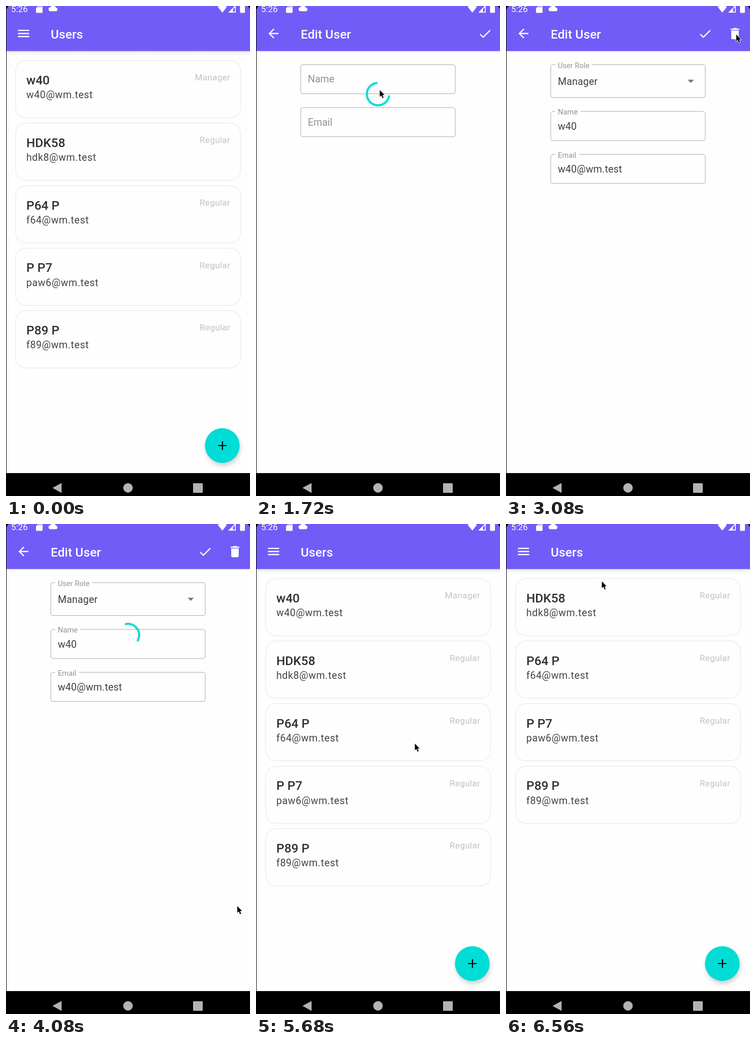
An HTML page for the animation above (6.6 s loop, 480 px wide and 962 px high).

```html
<!DOCTYPE html>
<html lang="en">
<head>
<meta charset="utf-8">
<title>Users</title>
<style>
html, body { margin: 0; width: 100%; height: 100%; overflow: hidden; background: #000; }
svg { display: block; width: 480px; height: 962px; font-family: Roboto, "Noto Sans", sans-serif; }
.title { font-size: 24.44px; font-weight: 500; fill: #fff; letter-spacing: .1px; }
.name { font-size: 24.44px; font-weight: 500; fill: #303030; }
.mail { font-size: 19.55px; fill: #444; letter-spacing: .61px; }
.role { font-size: 17.1px; fill: #c3c3c3; letter-spacing: .3px; text-anchor: end; }
.value { font-size: 19.55px; fill: #404040; letter-spacing: .18px; }
.label { font-size: 19.55px; fill: #929292; }
.small { font-size: 14.67px; fill: #989898; }
.box { fill: none; stroke: #b8b8b8; stroke-width: 1.25; }
.face { fill: #fefefe; filter: drop-shadow(0 .8px .9px rgba(0,0,0,.2)); }
.arc { fill: none; stroke: #00dcd2; stroke-width: 4.2; stroke-linecap: square; }

/* every clip shares one 6.6 s loop */
#edit, .loaded, .shift, .float, #check, #gone, #rest, #ripple, #cursor, .spin, .arc {
  animation: 6.6s linear infinite;
}
#edit { animation-name: page; }
@keyframes page {
  0%, 18.79% { opacity: 0; }
  20.3%, 77.27% { opacity: 1; }
  79.39%, 100% { opacity: 0; }
}
.loaded { animation-name: loaded; animation-timing-function: step-end; }
@keyframes loaded { 0% { visibility: hidden; } 29.09%, 100% { visibility: visible; } }
.shift { animation-name: shift; animation-timing-function: step-end; }
@keyframes shift { 0% { transform: none; } 29.09%, 100% { transform: translateY(91.8px); } }
#check { animation-name: check; animation-timing-function: step-end; }
@keyframes check { 0% { transform: none; } 29.09%, 100% { transform: translateX(-58.7px); } }
.float { animation-name: float; animation-timing-function: cubic-bezier(.4,0,.2,1); }
@keyframes float {
  0%, 29.09% { transform: translate(102px,35.2px); }
  31.52%, 100% { transform: translate(102px,6.6px) scale(.75); }
}
#gone { animation-name: gone; }
@keyframes gone { 0%, 90.3% { opacity: 1; } 92.12%, 100% { opacity: 0; } }
#rest { animation-name: rest; animation-timing-function: ease-in-out; }
@keyframes rest {
  0%, 92.12% { transform: none; }
  95.91%, 100% { transform: translateY(-122.8px); }
}
#ripple { animation-name: ripple; }
@keyframes ripple {
  0%, 14.54% { transform: scale(.26); opacity: 0; }
  15.45% { opacity: 1; }
  19.09%, 21.2% { transform: scale(1); opacity: 1; }
  21.21%, 100% { transform: scale(1); opacity: 0; }
}
#cursor { animation-name: cursor; animation-timing-function: ease-in-out; }
@keyframes cursor {
  0%, 4.85% { transform: translate(300px,975px); }
  11.52%, 26.36% { transform: translate(243.5px,165px); }
  30.91%, 35.15% { transform: translate(212px,483px); }
  44.85%, 48.48% { transform: translate(453px,56px); }
  55.15%, 78.5% { transform: translate(455px,750px); }
  86.06%, 87.27% { transform: translate(312.5px,431px); }
  98.18%, 100% { transform: translate(188.5px,112.5px); }
}

/* indeterminate rings: steady turn plus growing and shrinking arc */
#load { animation-name: turnA; }
#remove { animation-name: turnB; }
#load .arc { animation-name: arcA; }
#remove .arc { animation-name: arcB; }
.arc { animation-timing-function: cubic-bezier(.4,0,.2,1); stroke-dasharray: 0 1440; }
@keyframes turnA {
  0%, 19.31% { transform: rotate(0); visibility: hidden; }
  19.32% { transform: rotate(0); visibility: visible; }
  29.08% { transform: rotate(148deg); visibility: visible; }
  29.09%, 100% { transform: rotate(148deg); visibility: hidden; }
}
@keyframes arcA {
  0%, 19.32% { stroke-dasharray: 0 1440; }
  29.41%, 100% { stroke-dasharray: 270 1440; }
}
@keyframes turnB {
  0%, 48.1% { transform: rotate(0); visibility: hidden; }
  48.11% { transform: rotate(0); visibility: visible; }
  76.96% { transform: rotate(437.4deg); visibility: visible; }
  76.97%, 100% { transform: rotate(437.4deg); visibility: hidden; }
}
@keyframes arcB {
  0%, 48.11% { stroke-dasharray: 0 1440; stroke-dashoffset: 0; }
  58.2% { stroke-dasharray: 270 1440; stroke-dashoffset: 0; }
  68.29% { stroke-dasharray: 0 1440; stroke-dashoffset: -270; }
  78.38%, 100% { stroke-dasharray: 270 1440; stroke-dashoffset: -270; }
}
</style>
</head>
<body>
<svg viewBox="0 0 480 962">
  <defs>
    <clipPath id="screen"><rect x="1" y="-2.5" width="479" height="940" rx="12.5"/></clipPath>
    <clipPath id="cardClip"><rect x="19.5" y="107.5" width="441.5" height="111.5" rx="20"/></clipPath>
    <linearGradient id="fall" x2="0" y2="1">
      <stop stop-color="#000" stop-opacity=".12"/>
      <stop offset=".4" stop-color="#000" stop-opacity=".035"/>
      <stop offset="1" stop-color="#000" stop-opacity="0"/>
    </linearGradient>
    <filter id="soft" x="-50%" y="-50%" width="200%" height="200%"><feGaussianBlur stdDeviation="4"/></filter>
    <path id="ring" pathLength="720" d="M0-22a22 22 0 0 1 0 44a22 22 0 0 1 0-44a22 22 0 0 1 0 44a22 22 0 0 1 0-44"/>
  </defs>
  <rect width="480" height="962"/>

  <g clip-path="url(#screen)">
    <g id="users">
      <rect width="480" height="917" fill="#fefefe"/>
      <rect y="88" width="480" height="10" fill="url(#fall)"/>
      <rect width="480" height="88.5" fill="#715cf8"/>
      <path transform="translate(19.9 39.3) scale(1.222)" fill="#fff" d="M3 18h18v-2H3v2zm0-5h18v-2H3v2zm0-7v2h18V6H3z"/>
      <text class="title" x="88" y="64">Users</text>
      <g id="gone"></g>
      <g id="rest"></g>
      <circle cx="427" cy="869" r="34" fill="#000" opacity=".17" filter="url(#soft)"/>
      <circle cx="425.5" cy="863" r="34.2" fill="#00dcd6"/>
      <path d="M417.3 863h17M425.8 854.5v17" stroke="#000" stroke-width="2.2"/>
    </g>

    <g id="edit">
      <rect width="480" height="917" fill="#fefefe"/>
      <rect y="88" width="480" height="4" fill="url(#fall)" opacity=".6"/>
      <rect width="480" height="88.5" fill="#715cf8"/>
      <g fill="#fff">
        <path transform="translate(19.7 39.3) scale(1.222)" d="M20 11H7.83l5.59-5.59L12 4l-8 8 8 8 1.41-1.41L7.83 13H20v-2z"/>
        <g id="check"><path transform="translate(435.8 39.8) scale(1.222)" d="M9 16.17L4.83 12l-1.42 1.41L9 19 21 7l-1.41-1.41z"/></g>
        <g class="loaded"><path transform="translate(435.8 39.5) scale(1.222)" d="M6 19c0 1.1.9 2 2 2h8c1.1 0 2-.9 2-2V7H6v12zM19 4h-3.5l-1-1h-5l-1 1H5v2h14V4z"/></g>
      </g>
      <text class="title" x="88" y="64">Edit User</text>
      <g class="loaded">
        <rect class="box" x="88" y="115" width="304" height="64.6" rx="4.5"/>
        <rect x="97" y="112" width="72.5" height="6" fill="#fefefe"/>
        <text class="small" x="102" y="122">User Role</text>
        <text class="value" x="102" y="155.3">Manager</text>
        <path d="M357.4 144.8h12.2l-6.1 6.1z" fill="#777"/>
      </g>
      <g class="shift" id="fields"></g>
      <g transform="translate(240 173)"><g class="spin" id="load"><use class="arc" href="#ring"/></g></g>
      <g transform="translate(240 218)"><g class="spin" id="remove"><use class="arc" href="#ring"/></g></g>
    </g>

    <g id="status" fill="#fff">
      <text x="10" y="12.3" font-size="17">5:26</text>
      <path d="M63.5 0H72v12a1.4 1.4 0 0 1-1.4 1.4H60.4A1.4 1.4 0 0 1 59 12V4.5z"/>
      <path d="M64 0v3M67 0v3M70 0v3" stroke="#715cf8" stroke-width="1.2"/>
      <path d="M88 10.2a4 4 0 0 1-.6-8A5.8 5.8 0 0 1 98 3.1a3.6 3.6 0 0 1 .3 7.1z"/>
      <path d="M416.5 1.8Q418.5 0 420 0h11q1.700 0 3.500 1.800L425.600 13z"/>
      <path d="M437 13L452 -2V13zM446.500 6V11.400H450.300V2.200z" fill-rule="evenodd"/>
      <rect x="460.400" y="-2" width="9.600" height="15.400" rx="1.300"/>
    </g>
  </g>

  <rect y="917" width="480" height="45"/>
  <g fill="#b3b3b3">
    <path d="M91.500 946L109.300 936.500V956z"/>
    <circle cx="240" cy="946" r="9.300"/>
    <rect x="368" y="937" width="19" height="18.800" rx="1"/>
  </g>

  <g id="cursor">
    <path d="M0 0V13.200L3 10.500L5.300 15.900L7.500 15L5.300 9.700H9.300z" stroke="#fff" stroke-width="1.600" paint-order="stroke" stroke-linejoin="round"/>
  </g>
</svg>

<script>
const people = [
  ["w40", "w40", "Manager"],
  ["HDK58", "hdk8", "Regular"],
  ["P64 P", "f64", "Regular"],
  ["P P7", "paw6", "Regular"],
  ["P89 P", "f89", "Regular"]
];
const get = id => document.getElementById(id);
const mail = user => user + "@wm.test";

const ripple = `<g clip-path="url(#cardClip)"><g transform="translate(243.5 163)">
  <circle id="ripple" r="228" fill="#efefef"/></g></g>`;

function card([name, user, role], i) {
  return `<g transform="translate(0 ${i * 122.8})">
    <rect class="face" x="19.5" y="107.5" width="441.5" height="111.5" rx="20"/>
    <rect x="19.5" y="107.5" width="441.5" height="111.5" rx="20" fill="none" stroke="#f1f1f1"/>
    ${i ? "" : ripple}
    <text class="name" x="40" y="154">${name}</text>
    <text class="mail" x="40" y="181.3">${mail(user)}</text>
    <text class="role" x="441" y="146.3">${role}</text>
  </g>`;
}

function field(label, value, y, gap) {
  return `<g transform="translate(0 ${y})">
    <rect class="box" x="88" y="0" width="304" height="57.3" rx="4.5"/>
    <rect class="loaded" x="97" y="-3" width="${gap}" height="6" fill="#fefefe"/>
    <text class="label float">${label}</text>
    <text class="value loaded" x="102" y="36.3">${value}</text>
  </g>`;
}

const cards = people.map(card);
get("gone").innerHTML = cards[0];
get("rest").innerHTML = cards.slice(1).join("");
get("fields").innerHTML =
  field("Name", people[0][0], 115, 49.5) +
  field("Email", mail(people[0][1]), 199.3, 46.5);
</script>
</body>
</html>
```
